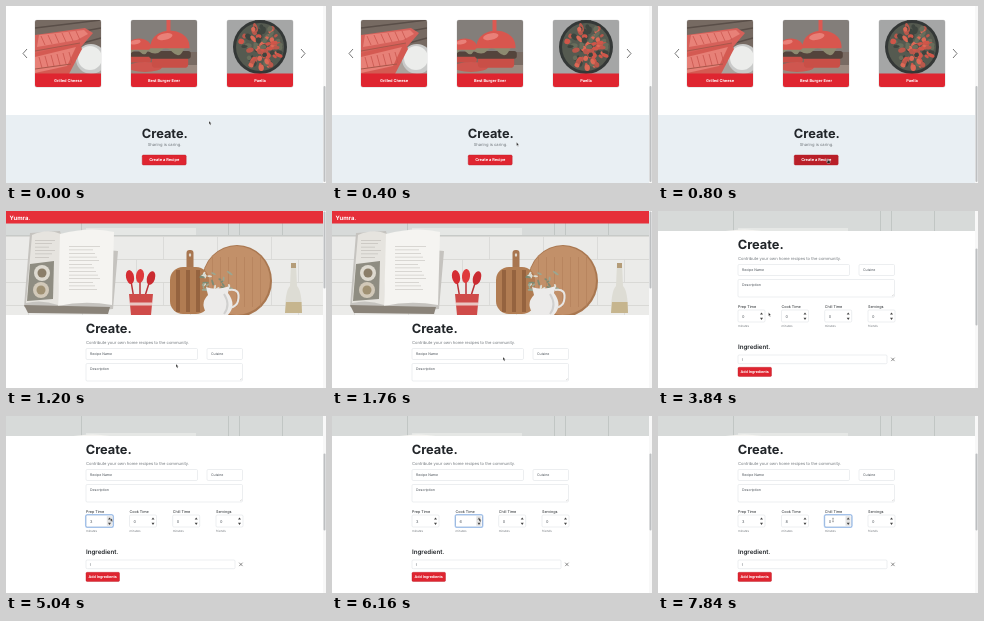
Write an HTML page with a canvas that moves like this. It is 320 px wide and 177 px high and loops after 8000 ms.

```html
<!DOCTYPE html>
<html lang="en">
<head>
<meta charset="utf-8">
<title>Recipes</title>
<style>
html, body { margin: 0; width: 100%; height: 100%; overflow: hidden; background: #fff; }
canvas { display: block; width: 100vw; height: 100vh; }
</style>
</head>
<body>
<canvas></canvas>
<script>
const W = 320, H = 177, LOOP = 8000;
const RED = '#df2530', DARK = '#212529', GREY = '#70767b', LINE = '#d9dde1';
const OPEN_FORM = 1040, SCROLL_FROM = 1840, SCROLL_TO = 2320, SCROLL = 84;
const canvas = document.querySelector('canvas');
const c = canvas.getContext('2d');

// --- drawing helpers ---
function rect(x, y, w, h, fill) {
  c.fillStyle = fill;
  c.fillRect(x, y, w, h);
}
function box(x, y, w, h, r, fill, stroke, lw = 0.5) {
  c.beginPath();
  c.roundRect(x, y, w, h, r);
  if (fill) { c.fillStyle = fill; c.fill(); }
  if (stroke) { c.strokeStyle = stroke; c.lineWidth = lw; c.stroke(); }
}
function oval(x, y, rx, ry, fill, turn = 0) {
  c.beginPath();
  c.ellipse(x, y, rx, ry, turn, 0, 7);
  c.fillStyle = fill;
  c.fill();
}
function shape(d, fill, stroke, lw = 0.6) {
  const p = new Path2D(d);
  if (fill) { c.fillStyle = fill; c.fill(p); }
  if (stroke) { c.strokeStyle = stroke; c.lineWidth = lw; c.stroke(p); }
}
function text(s, x, y, size, fill = DARK, weight = 400, align = 'left') {
  c.font = `${weight} ${size}px Inter, Roboto, sans-serif`;
  c.textRendering = 'geometricPrecision';
  c.textAlign = align;
  c.fillStyle = fill;
  c.fillText(s, x, y);
}
function at(x, y, draw, scale = 1) {
  c.save();
  c.translate(x, y);
  c.scale(scale, scale);
  draw();
  c.restore();
}
function clipped(x, y, w, h, r, draw) {
  c.save();
  c.beginPath();
  c.roundRect(x, y, w, h, r);
  c.clip();
  draw();
  c.restore();
}
function random(seed) {
  return () => (seed = seed * 16807 % 2147483647) / 2147483647;
}
const ease = k => k * k * (3 - 2 * k);
const clamp = k => Math.max(0, Math.min(1, k));

// --- dishes, each 66 by 54 ---
function sandwich() {
  rect(0, 0, 66, 54, '#766a62');
  shape('M0 8L66 0M0 20L66 8M30 28L66 18', null, '#594e48', 1.5);
  shape('M0 44L40 30L66 28V54H0Z', '#aaa39d');
  oval(56, 39, 15, 15, '#c9cac9');
  oval(55, 38, 12, 12, '#ecedeb');
  shape('M0 15L50 8L58 13L46 27L0 34Z', '#d6615a');
  shape('M4 15L49 10L53 14L42 20L2 27Z', '#e88178');
  shape('M0 33L44 23L47 29L34 54H0Z', '#d45a52');
  shape('M0 37L41 27L32 46L0 53Z', '#e78077');
  for (let i = 0; i < 6; i++) {
    shape(`M${6 + i * 7} ${16 - i}l4 9M${4 + i * 6} ${37 - i}l3 11`, null, '#c9564e', 0.8);
  }
  shape('M0 31L45 23M0 49L36 44', null, '#a8574b', 1.2);
}
function burger(x, y, scale) {
  at(x, y, () => {
    box(-14, 7, 28, 9, 3, '#c94f47');
    box(-16, 3, 32, 6, 2, '#54443c');
    shape('M-17 3Q-11 7-7 3T2 4T10 3T17 3L14 0H-14Z', '#8d8a70');
    shape('M-15 1C-16-17 16-17 15 1Z', '#d8564e');
    oval(-4, -8, 6, 2.5, '#e98078', -0.2);
  }, scale);
}
function burgers() {
  rect(0, 0, 66, 54, '#837e7a');
  rect(0, 32, 66, 22, '#796b63');
  rect(0, 45, 66, 9, '#9b8a80');
  rect(35.5, 0, 4, 15, '#dc5952');
  burger(8, 29, 0.85);
  oval(14, 47, 17, 5, '#cf564f');
  burger(39, 27, 1.3);
}
function paella() {
  rect(0, 0, 66, 54, '#a5a6a6');
  box(28, -4, 10, 9, 2, '#555857');
  oval(33, 27, 27, 27, '#343837');
  oval(33, 27, 24, 24, '#555a50');
  const rnd = random(41);
  for (let i = 0; i < 80; i++) {
    const a = rnd() * 6.28, d = Math.sqrt(rnd()) * 21;
    const tone = ['#cf5649', '#b9584b', '#dc6855', '#3e453f', '#686d5b'][i % 5];
    oval(33 + d * Math.cos(a), 27 + d * Math.sin(a), 2 + rnd() * 2, 1.3 + rnd() * 1.5, tone, a);
  }
}

// --- home page ---
function scrollbar(y, h) {
  rect(317, 0, 3, H, '#f8f8f8');
  box(317.5, y, 2, h, 1, '#bdbfc1');
}
function button(label, x, y, w, h, size, hover) {
  box(x, y, w, h, 1.2, hover ? '#b91f28' : RED, '#b81b25', 0.4);
  text(label, x + w / 2, y + h / 2 + size * 0.36, size, '#fff', 700, 'center');
}
function card(x, name, dish) {
  box(x - 0.4, 13.8, 66.8, 67.8, 2, '#d9d9d9');
  clipped(x, 14, 66, 67, 2, () => {
    at(x, 14, dish);
    rect(x, 67.5, 66, 14, RED);
  });
  text(name, x + 33, 75.8, 3.95, '#fff', 700, 'center');
}
function home(hover) {
  card(29, 'Grilled Cheese', sandwich);
  card(125, 'Best Burger Ever', burgers);
  card(221, 'Paella', paella);
  shape('M21 43L17 47.5L21 52M295 43L299 47.5L295 52', null, '#555', 0.8);
  rect(0, 109, W, 68, '#e9eff3');
  text('Create.', 158.8, 131.5, 12.8, DARK, 700, 'center');
  text('Sharing is caring.', 158.5, 140.2, 4.1, GREY, 400, 'center');
  button('Create a Recipe', 136.2, 149, 44, 10, 3.95, hover);
  scrollbar(80, 96);
}

// --- kitchen picture, fixed behind the scrolling page ---
function kitchen() {
  rect(0, 0, W, 104, '#ebebe9');
  for (let row = 0; row < 4; row++) {
    const y = 25 + row * 23;
    rect(0, y, W, 0.8, '#d5d5d2');
    for (let x = row % 2 * 27 - 5; x < W; x += 54) rect(x, y, 0.8, 23, '#d8d8d5');
  }
  rect(0, 0, W, 25, '#d7dad9');
  rect(80, 17, 110, 7, '#e5e7e5');
  rect(0, 24, W, 1, '#c7cac8');
  for (const x of [75, 222, 233, 276]) rect(x, 0, 0.9, 24, '#bfc4c2');

  // recipe book on its stand
  shape('M18 96L24 22L54 20L58 35L112 40L107 98L62 102Z', '#c5c3bf');
  shape('M20 92L26 24Q42 17 55 23L52 94Q36 88 20 92Z', '#e6e4df');
  shape('M54 23Q84 15 108 21L106 94Q78 89 52 95Z', '#f5f4f1');
  shape('M24 53L48 50L47 88L21 90Z', '#8f8d82');
  oval(36, 62, 8, 8, '#dedad0');
  oval(35, 79, 8, 8, '#d2c9b9');
  oval(36, 62, 4.5, 4.5, '#8b7e69');
  oval(35, 79, 4.5, 4.5, '#a09173');
  for (let i = 0; i < 13; i++) rect(63, 35 + i * 3.6, 31 - i * 7 % 9, 0.6, '#c5c4bf');
  for (let i = 0; i < 6; i++) rect(29, 29 + i * 3.4, 20 - i % 3 * 3, 0.6, '#bcbab5');
  shape('M18 94L104 96L102 103L22 102Z', '#8a8379');

  // jar of utensils
  shape('M128 88L124 64M134 88V64M138 88L145 66', null, '#b93136', 1.5);
  oval(124, 66, 4, 7, '#d52d33', -0.2);
  oval(134, 65, 4, 7, '#df3a3c', 0.1);
  oval(145, 67, 4, 7, '#ca2b31', 0.3);
  shape('M123 83H147L145 104H125Z', '#cf4b49');
  shape('M124 93H146', null, '#e9c6c2', 3);

  // boards
  oval(231, 70, 35, 36, '#a97750');
  oval(230.5, 69.5, 33.5, 34.5, '#c29069');
  for (let x = 206; x < 260; x += 8) rect(x, 46, 0.7, 50, '#b3825c');
  box(180.5, 39, 7, 24, 3, '#a87650');
  box(164, 56, 39, 47, 13, '#b17c52');
  for (let x = 170; x < 200; x += 10) rect(x, 59, 4, 42, '#95633f');
  oval(184, 44, 1.2, 1.7, '#e0d8ce');

  // pitcher with leaves
  const rnd = random(17);
  for (let i = 0; i < 26; i++) {
    oval(196 + rnd() * 28, 60 + rnd() * 20, 1.5 + rnd() * 2, 1, ['#7c8b75', '#9ba691', '#dcddd4'][i % 3], rnd() * 3);
  }
  shape('M200 76Q210 80 224 75L222 82Q231 94 222 104H202Q193 93 202 84Z', '#ecebea');
  shape('M223 79Q235 77 232 90Q231 95 224 97', null, '#e7e6e4', 2);
  shape('M218 83Q225 94 218 103', null, '#d0d0cf', 2);

  // oil bottle
  shape('M285 53H290L291 75Q296 80 296 102H279Q279 80 284 75Z', '#dddcd4');
  shape('M280 91H295.5L296 102H279Z', '#c6b58e');
  rect(285, 52, 5, 5, '#b49c78');
}

// --- form page ---
function numberField(x, label, unit, value, focus) {
  text(label, x, 181, 3.75);
  if (focus) box(x - 0.3, 182.8, 27.6, 12.4, 1.8, null, '#bcd4f5', 1.5);
  box(x, 183, 27, 12, 1.2, '#fff', focus ? '#5b88c4' : LINE);
  text(value, x + 4, 190.7, 3.9, '#495057');
  if (focus) rect(x + 20.8, 184.2, 5, 9.6, '#e4e4e4');
  shape(`M${x + 22} 187.6h3l-1.5-2.2ZM${x + 22} 190.8h3l-1.5 2.2Z`, '#444');
  text(unit, x, 199.6, 3, GREY);
}
function field(x, y, w, h, label) {
  box(x, y, w, h, 1.2, '#fff', LINE);
  text(label, x + 4, y + 6.5, 3.5, '#495057');
}
const steps = (t, from, gap, top) => Math.max(0, Math.min(top, Math.floor((t - from) / gap) + 1));

function form(t) {
  const scroll = SCROLL * ease(clamp((t - SCROLL_FROM) / (SCROLL_TO - SCROLL_FROM)));
  clipped(0, 0, W, 104 - scroll, 0, kitchen);
  at(0, -scroll, () => {
    rect(0, 0, W, 12.5, '#e62f39');
    text('Yumra.', 3.5, 8.5, 5.9, '#fff', 700);
    text('Create.', 79.7, 122.3, 12.8, DARK, 700);
    text('Contribute your own home recipes to the community.', 80, 132.5, 4.12, GREY);
    field(80, 137.5, 111.5, 11, 'Recipe Name');
    field(201, 137.5, 35.5, 11, 'Cuisine');
    field(80, 152.5, 156.5, 17.5, 'Description');
    shape('M234 169l1.6-1.6M235 169.2l.8-.8', null, '#999', 0.3);
    const prep = steps(t, 4320, 240, 3), cook = steps(t, 5560, 120, 6) + steps(t, 6260, 160, 2);
    numberField(80, 'Prep Time', 'minutes', prep, t > 4320 && t < 5560);
    numberField(123.5, 'Cook Time', 'minutes', cook, t >= 5560 && t < 7300);
    numberField(166.7, 'Chill Time', 'minutes', 0, t >= 7300);
    if (t >= 7300 && (t - 7300) % 1000 < 500) rect(173.6, 187, 0.4, 4.4, '#333');
    numberField(210, 'Servings', 'friends', 0, false);
    text('Ingredient.', 80, 221.8, 6.2, DARK, 600);
    box(80, 228, 149, 8.7, 1.2, '#fff', LINE);
    text('1', 83.8, 233.7, 3.4, '#495057');
    shape('M233.2 230.7l3.4 3.4m0-3.4l-3.4 3.4', null, '#444', 0.6);
    button('Add Ingredients', 80, 240.3, 33.5, 9.2, 3.65);
  });
  scrollbar(scroll * 0.44 + 0.5, 77);
}

// --- pointer: time, x, y ---
const path = [
  [0, 203, 115], [120, 203, 115], [640, 170, 153], [1300, 170, 153], [1700, 171, 146],
  [1840, 171, 146], [2400, 152.5, 116], [3200, 152.5, 116], [3800, 110.5, 101.5],
  [4000, 110.5, 101.5], [4240, 103.5, 102], [5000, 103.5, 102], [5440, 147, 102],
  [6740, 147, 102], [7200, 175, 104], [LOOP, 175, 104]
];
function pointerAt(t) {
  const i = path.findIndex(p => p[0] > t);
  const [t0, x0, y0] = path[i - 1], [t1, x1, y1] = path[i];
  const k = ease((t - t0) / (t1 - t0));
  return [x0 + (x1 - x0) * k, y0 + (y1 - y0) * k];
}
function pointer(x, y, kind) {
  const d = {
    arrow: 'M0 0V4.6L1.1 3.7L1.9 5.5L2.7 5.1L1.9 3.4H3.3Z',
    hand: 'M-.6 0Q0-.8.6 0V2L2.8 2.6Q3.4 4.6 2.1 6H-.6L-2.2 3.4Q-1.6 2.6-.6 3.6Z',
    beam: 'M-1-2.4Q0-2.4 0-1.8Q0-2.4 1-2.4M0-1.8V1.8M-1 2.4Q0 2.4 0 1.8Q0 2.4 1 2.4'
  }[kind];
  at(x, y, () => kind === 'beam' ? shape(d, null, '#222', 0.5) : shape(d, '#222', '#fff', 0.4), 0.75);
}

function draw(t) {
  const dpr = devicePixelRatio || 1;
  const w = Math.round(innerWidth * dpr), h = Math.round(innerHeight * dpr);
  if (canvas.width !== w || canvas.height !== h) {
    canvas.width = w;
    canvas.height = h;
  }
  c.setTransform(w / W, 0, 0, h / H, 0, 0);
  rect(0, 0, W, H, '#fff');
  const [x, y] = pointerAt(t);
  const hover = t < OPEN_FORM && x > 136 && x < 180 && y > 149 && y < 159;
  if (t < OPEN_FORM) home(hover);
  else form(t);
  pointer(x, y, hover ? 'hand' : t > 7080 ? 'beam' : 'arrow');
}
function tick(now) {
  draw(now % LOOP);
  requestAnimationFrame(tick);
}
draw(0);
requestAnimationFrame(tick);
</script>
</body>
</html>
```
